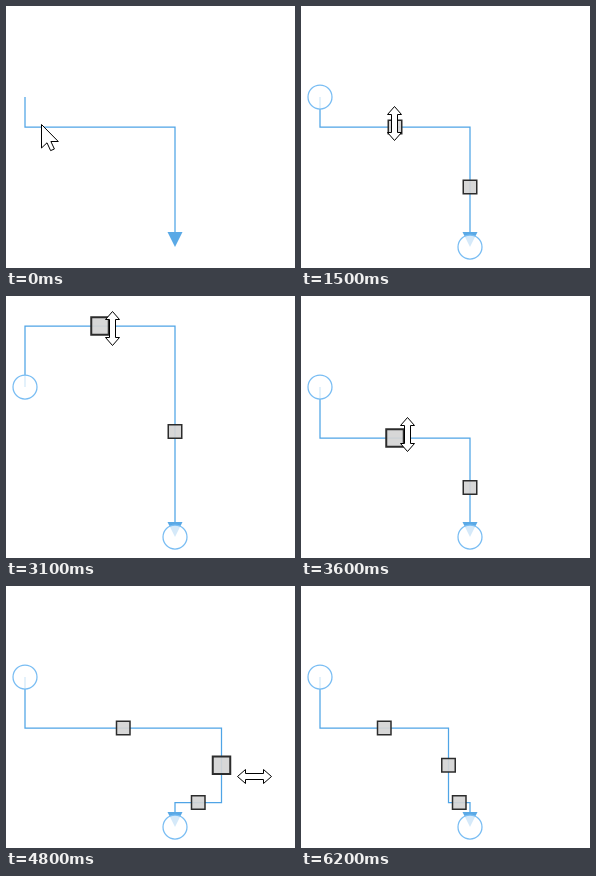
Write an HTML page with a canvas that moves like this. It is 289 by 262 pixels and loops after 6.7 s.

```html
<!DOCTYPE html>
<html lang="en">
<head>
<meta charset="utf-8">
<title>Connector editing</title>
<style>
html, body { margin: 0; width: 100%; height: 100%; overflow: hidden; background: #fff; }
canvas { display: block; }
</style>
</head>
<body>
<canvas id="stage" width="289" height="262"></canvas>
<script>
const ctx = document.getElementById('stage').getContext('2d');
const LOOP = 6700, STEP = 100;
const BLUE = '#4fa4e6', RING = '#79bdf3';
const START = { x: 19, y: 91 }, END = { x: 169, y: 241 };
const LOWER = 216.5, GRIP = 3.5;

// Eased pointer moves, each starting where the last one stopped
const home = { x: 35, y: 118 };
const moves = [
  { from: 800, to: 1500, x: 93.5, y: 117.5 },
  { from: 2200, to: 2600, x: 99.5, y: 72.5 },
  { from: 2600, to: 2900, x: 106, y: 26.5 },
  { from: 3000, to: 3500, x: 106, y: 138.5 },
  { from: 3700, to: 4200, x: 165.5, y: 190.5 },
  { from: 4500, to: 4900, x: 258.5, y: 190.5 },
  { from: 5120, to: 5300, x: 216.5, y: 196.5 },
  { from: 5300, to: 5600, x: 144, y: 150 },
  { from: 5800, to: 6000, x: 88, y: 233 }
];

const clamp = (v, lo, hi) => Math.max(lo, Math.min(hi, v));
const within = (t, a, b) => t >= a && t < b;
const mix = (a, b, p) => a + (b - a) * p;
const ease = p => p * p * p * (p * (p * 6 - 15) + 10);

function pointerAt(t) {
  let { x, y } = home;
  for (const m of moves) {
    const p = ease(clamp((t - m.from) / (m.to - m.from), 0, 1));
    x = mix(x, m.x, p);
    y = mix(y, m.y, p);
  }
  return { x, y };
}

function trace(points, closed) {
  ctx.beginPath();
  points.forEach(([x, y]) => ctx.lineTo(x, y));
  if (closed) ctx.closePath();
}

function paint(fill, stroke, width) {
  ctx.fillStyle = fill;
  ctx.strokeStyle = stroke;
  ctx.lineWidth = width;
  ctx.fill();
  ctx.stroke();
}

function connector(x, y, shifted) {
  const bend = shifted ? [[x, LOWER], [END.x, LOWER]] : [];
  trace([[START.x, START.y], [START.x, y], [x, y], ...bend, [END.x, 228]]);
  ctx.strokeStyle = BLUE;
  ctx.lineWidth = 1.25;
  ctx.stroke();
  trace([[END.x - 7.5, 226], [END.x + 7.5, 226], [END.x, END.y]], true);
  ctx.fillStyle = '#5aa9e6';
  ctx.fill();
}

function ring({ x, y }) {
  ctx.beginPath();
  ctx.arc(x, y, 12, 0, Math.PI * 2);
  paint('rgba(255,255,255,.75)', RING, 1.25);
}

function handle(x, y, held) {
  const r = held ? 8.75 : 6.75;
  ctx.beginPath();
  ctx.rect(x - r, y - r, r * 2, r * 2);
  paint('rgba(212,212,212,.92)', '#2c2c2c', held ? 2 : 1.5);
}

const arrow = [[0, 0], [0, 23.5], [5.5, 18.3], [9.1, 26.1], [12.9, 24.5], [9.4, 17], [16.8, 17]];

// One quarter of the double arrow, mirrored both ways
const quarter = [[0, -17], [7, -9], [3, -9]];
const flip = (points, sx, sy) => points.map(([x, y]) => [x * sx, y * sy]);
const right = [...quarter, ...flip(quarter, 1, -1).reverse()];
const resizeTall = [...right, ...flip(right, -1, 1).reverse()];
const resizeWide = resizeTall.map(([x, y]) => [y, x]);

function cursor(t) {
  const { x, y } = pointerAt(t);
  const shape = within(t, 1400, 3800) ? resizeTall
    : within(t, 4200, 5900) ? resizeWide : arrow;
  ctx.save();
  ctx.translate(Math.floor(x) + .5, Math.floor(y) + .5);
  trace(shape, true);
  paint('#fff', '#000', 1);
  ctx.restore();
}

function draw(time) {
  const t = Math.floor(time % LOOP / STEP) * STEP;
  // The line trails the pointer by one step
  const y = Math.round(pointerAt(clamp(t - STEP, 2200, 3500)).y + GRIP);
  const x = pointerAt(clamp(t - STEP, 4500, 5600)).x + GRIP;
  const shifted = Math.abs(x - END.x) > 1;

  ctx.fillStyle = '#fff';
  ctx.fillRect(0, 0, 289, 262);
  connector(x, y, shifted);
  if (t >= 300) {
    ring(START);
    ring(END);
    handle(mix(START.x, x, .5), y, within(t, 2200, 3800));
    if (shifted) handle(mix(x, END.x, .5), LOWER, false);
    handle(x, mix(y, shifted ? LOWER : END.y, .5), within(t, 4500, 5900));
  }
  if (t < 6200) cursor(t);
}

const begin = performance.now();
function tick() {
  draw(performance.now() - begin);
  requestAnimationFrame(tick);
}
tick();
</script>
</body>
</html>
```
